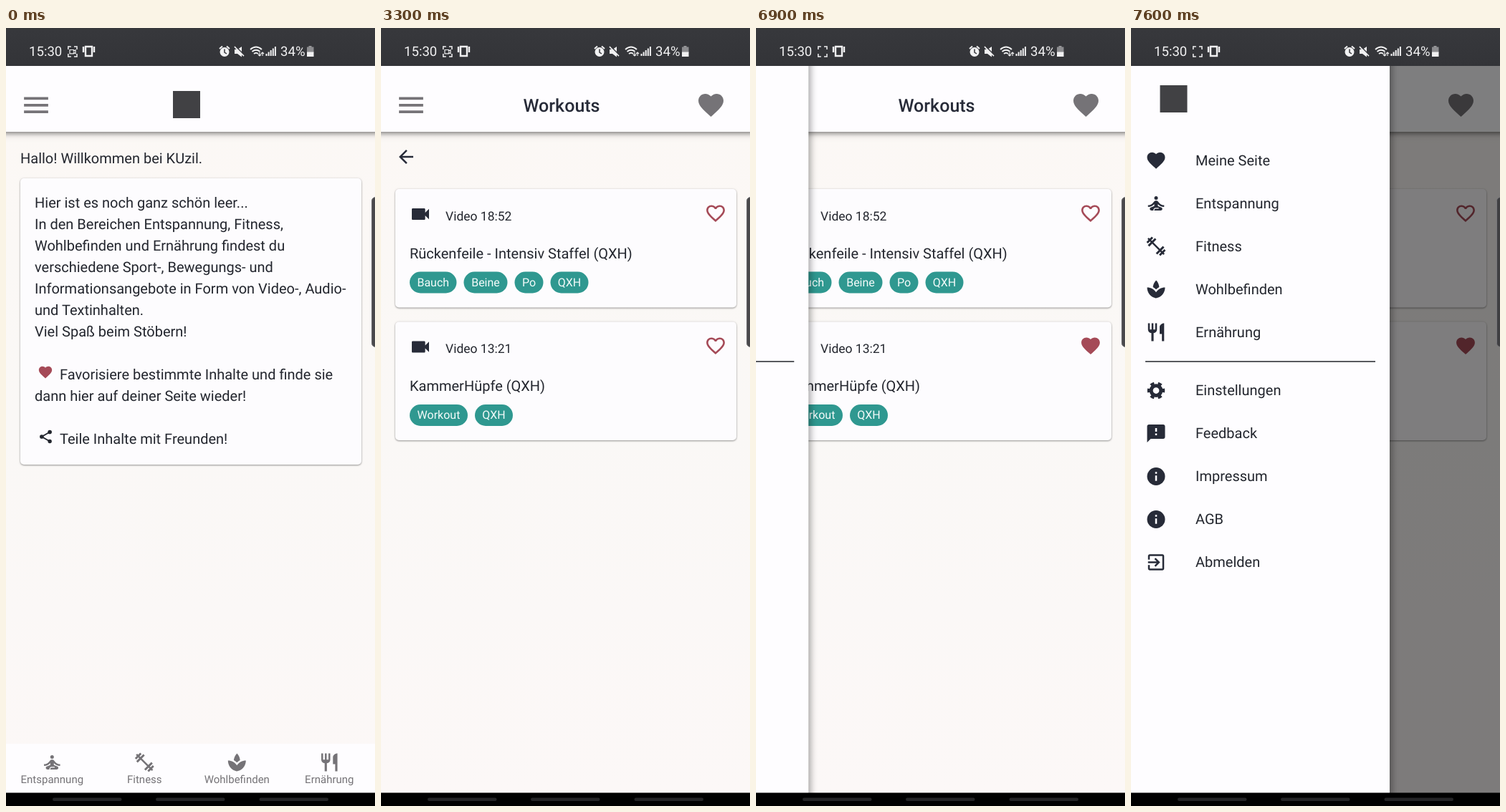
An HTML page for the animation above (8000 ms loop, 515 by 1087 pixels).

```html
<!DOCTYPE html>
<html lang="de">
<head>
<meta charset="utf-8">
<title>App-Rundgang</title>
<style>
  html, body { margin: 0; width: 100%; height: 100%; overflow: hidden; background: #000; }
  svg { display: block; width: 515px; height: 1087px; font-family: Roboto, sans-serif; }
  text { text-rendering: geometricPrecision; white-space: pre; }
  .card { fill: #fdfcfe; filter: drop-shadow(0 1.5px 1px rgba(0,0,0,.36)) drop-shadow(0 0 1.5px rgba(0,0,0,.1)); }
  .toolbar { fill: #fefdff; filter: drop-shadow(0 2px 3px rgba(0,0,0,.42)) drop-shadow(0 3px 5px rgba(0,0,0,.14)); }
  .panel { fill: #fefdff; filter: drop-shadow(3px 0 5px rgba(0,0,0,.35)); }
</style>
</head>
<body>
<svg id="stage" viewBox="0 0 515 1087"></svg>
<script>
const INK = '#23262e', DARK = '#272b38', GREY = '#757377', RED = '#a54a57', TEAL = '#2f9890', LOGO = '#414144';
const LOOP = 8000, STEP = 100;

// Icons on a 24 unit grid
const HEART = '<path d="M12 21.35l-1.45-1.32C5.4 15.36 2 12.28 2 8.5 2 5.42 4.42 3 7.5 3c1.74 0 3.41.81 4.5 2.09C13.09 3.81 14.76 3 16.5 3 19.58 3 22 5.42 22 8.5c0 3.78-3.4 6.86-8.55 11.54z"/>';
const icons = {
  heart: HEART,
  heartLine: '<path d="M16.5 3c-1.74 0-3.41.81-4.5 2.09C10.91 3.81 9.24 3 7.5 3 4.42 3 2 5.42 2 8.5c0 3.78 3.4 6.86 8.55 11.54L12 21.35l1.45-1.32C18.6 15.36 22 12.28 22 8.5 22 5.42 19.58 3 16.5 3zm-4.4 15.55l-.1.1-.1-.1C7.14 14.24 4 11.39 4 8.5 4 6.5 5.5 5 7.5 5c1.54 0 3.04.99 3.57 2.36h1.87C13.46 5.99 14.96 5 16.5 5c2 0 3.5 1.5 3.5 3.5 0 2.89-3.14 5.74-7.9 10.05z"/>',
  share: '<path d="M18 5L6 12l12 7" fill="none" stroke="currentColor" stroke-width="2"/><circle cx="18" cy="5" r="3"/><circle cx="6" cy="12" r="3"/><circle cx="18" cy="19" r="2.9"/>',
  menu: '<path d="M3 18h18v-2H3zm0-5h18v-2H3zm0-7v2h18V6z"/>',
  back: '<path d="M20 11H7.83l5.59-5.59L12 4l-8 8 8 8 1.41-1.41L7.83 13H20z"/>',
  infoLine: '<circle cx="12" cy="12" r="9" fill="none" stroke="currentColor" stroke-width="2"/><path d="M11 7h2v2h-2zm0 4h2v6h-2z"/>',
  info: '<circle cx="12" cy="12" r="10"/><path d="M11 7h2v2h-2zm0 4h2v6h-2z" fill="#fefdff"/>',
  video: '<path d="M17 10.5V7c0-.55-.45-1-1-1H4c-.55 0-1 .45-1 1v10c0 .55.45 1 1 1h12c.55 0 1-.45 1-1v-3.5l4 4v-11z"/>',
  cutlery: '<path d="M11 9H9V2H7v7H5V2H3v7c0 2.12 1.66 3.84 3.75 3.97V22h2.5v-9.03C11.34 12.84 13 11.12 13 9V2h-2zm5-3v8h2.5v8H21V2c-2.76 0-5 2.24-5 4z"/>',
  leaf: '<path d="M15.49 9.63C15.31 6.84 14.18 4.12 12.06 2 9.92 4.14 8.74 6.86 8.51 9.63c1.28.68 2.46 1.56 3.49 2.63 1.03-1.06 2.21-1.94 3.49-2.63zM12 15.45C9.85 12.17 6.18 10 2 10c0 5.32 3.36 9.82 8.03 11.49.63.23 1.29.4 1.97.51.68-.12 1.33-.29 1.97-.51C18.64 19.82 22 15.32 22 10c-4.18 0-7.85 2.17-10 5.45z"/>',
  lotus: '<circle cx="12" cy="6" r="2"/><path d="M21 16v-2c-2.24 0-4.16-.96-5.6-2.68l-1.34-1.6C13.68 9.26 13.12 9 12.53 9h-1.05c-.6 0-1.15.26-1.53.72l-1.34 1.6C7.16 13.04 5.24 14 3 14v2c2.77 0 5.19-1.17 7-3.25V15l-3.88 1.55C5.45 16.82 5 17.48 5 18.21 5 19.2 5.8 20 6.79 20H9v-.5c0-1.38 1.12-2.5 2.5-2.5h3c.28 0 .5.22.5.5s-.22.5-.5.5h-3c-.83 0-1.5.67-1.5 1.5v.5h7.1c.85 0 1.65-.5 1.86-1.32.22-.86-.24-1.7-1.03-2.02L14 15v-2.25c1.81 2.08 4.23 3.25 7 3.25z"/>',
  dumbbell: '<g transform="translate(12 12) rotate(45)" fill="none" stroke="currentColor" stroke-width="2.3"><path d="M-12.6 0H12.6" stroke-width="2"/><path d="M-6.3-5.6V5.6M6.3-5.6V5.6M-9.9-4.2V4.2M9.9-4.2V4.2"/></g>',
  gear: '<g fill="none" stroke="currentColor"><circle cx="12" cy="12" r="5.5" stroke-width="4"/><circle cx="12" cy="12" r="8.3" stroke-width="3" pathLength="12" stroke-dasharray="1 1" stroke-dashoffset=".5"/></g>',
  feedback: '<path d="M20 2H4c-1.1 0-2 .9-2 2v18l4-4h14c1.1 0 2-.9 2-2V4c0-1.1-.9-2-2-2zm-7 12h-2v-2h2zm0-4h-2V6h2z"/>',
  exit: '<path d="M10.09 15.59L11.5 17l5-5-5-5-1.41 1.41L12.67 11H3v2h9.67zM19 3H5c-1.11 0-2 .9-2 2v4h2V5h14v14H5v-4H3v4c0 1.1.89 2 2 2h14c1.1 0 2-.9 2-2V5c0-1.1-.9-2-2-2z"/>'
};

const icon = (name, cx, cy, size, color, id = '') =>
  `<g ${id && `id="${id}"`} transform="translate(${cx - size / 2} ${cy - size / 2}) scale(${size / 24})" fill="${color}" color="${color}">${icons[name]}</g>`;
const text = (x, y, str, size = 20, fill = INK, extra = '') =>
  `<text x="${x}" y="${y}" font-size="${size}" fill="${fill}" ${extra}>${str}</text>`;
const rect = (x, y, w, h, fill, r = 0) =>
  `<rect x="${x}" y="${y}" width="${w}" height="${h}" rx="${r}" fill="${fill}"/>`;
const card = (y, h) => `<rect class="card" x="20" y="${y}" width="476" height="${h}" rx="5"/>`;
const centred = 'text-anchor="middle"';
const logo = (cx, cy) => rect(cx - 19, cy - 19, 38, 38, LOGO);
const title = str => text(252, 116.5, str, 25, DARK, centred + ' font-weight="500"') + icon('heart', 460.5, 107.7, 42, GREY);

function statusBar() {
  const w = '#f1f1f2', bg = '#35363a';
  const bars = [0, 1, 2, 3, 4].map(i => rect(362.5 + i * 3.1, 36 - i * 2.5, 2, 3 + i * 2.5, w)).join('');
  return rect(0, 0, 515, 53, 'url(#bar)') + text(32, 39.4, '15:30', 18.6, w) + text(383, 39.4, '34%', 18.6, w) +
    `<g fill="none" stroke="${w}" stroke-width="1.5">
      <path d="M86.8 30v-4h4M95 26h4v4M99 36v4h-4M90.800 40h-4v-4"/>
      <path d="M111 26h9v13h-9zM108 26v8M123 26v8" stroke-width="2.4"/>
      <path d="M341 30q8-7 16 0M343.500 33q5.500-4.500 11 0M346 36q3-2.500 6 0" stroke-width="1.900"/>
      <path d="M354 34v5m-2-2 2 2 2-2M358 39v-5m-2 2 2-2 2 2" stroke-width="1.100"/>
      <path d="M298 29l4-3.500M312 29l-4-3.500" stroke-width="2"/>
      <path d="M319 26l13 13" stroke-width="1.800"/>
    </g>
    <circle cx="305" cy="33.500" r="6.500" fill="${w}"/><path d="M305 29.500v4.500l3 2" fill="none" stroke="${bg}" stroke-width="1.500"/>
    <path d="M319 30v6h4l6 4.500V26l-6 4z" fill="${w}"/><path d="M320 25l13 13" stroke="${bg}" stroke-width="1.300"/>
    <path id="camera" d="M89 30.500h5.500v1.800l2.500-1.500v5l-2.500-1.500v1.500H89z" fill="none" stroke="${w}" stroke-width="1.200"/>` +
    bars + rect(422.5, 25, 4, 2, '#9a9a9c') + rect(420, 26.5, 9.5, 8, '#8c8c8f') + rect(420, 33.5, 9.5, 6.5, w);
}

function homePage() {
  const lines = ['Hier ist es noch ganz schön leer...', 'In den Bereichen Entspannung, Fitness,', 'Wohlbefinden und Ernährung findest du',
    'verschiedene Sport-, Bewegungs- und', 'Informationsangebote in Form von Video-, Audio-', 'und Textinhalten.', 'Viel Spaß beim Stöbern!'];
  return text(20, 189, 'Hallo! Willkommen bei KUzil.') + card(210, 400) +
    lines.map((s, i) => text(40, 251.3 + i * 30, s)).join('') +
    icon('heart', 55, 481, 22, RED) + text(75, 491.3, 'Favorisiere bestimmte Inhalte und finde sie') +
    text(40, 521.3, 'dann hier auf deiner Seite wieder!') +
    icon('share', 55.5, 571, 22.5, INK) + text(75, 581.3, 'Teile Inhalte mit Freunden!');
}

const fitnessPage = () => ['Alle Inhalte', 'Yoga', 'Workouts', 'Gesundheit', 'Aufwärmübungen'].map((s, i) => {
  const y = 155 + i * 62;
  return rect(40, y - .2, 436, 1.6, '#b25a68') + text(40, y + 38.2, s) + icon('infoLine', 444.7, y + 31.5, 23.5, GREY);
}).join('');

function videoCard(y, time, name, tags, heart) {
  let x = 40;
  const chips = tags.map(([label, w]) => {
    const chip = rect(x, y + 115.500, w, 30, TEAL, 15) + text(x + w / 2, y + 135.6, label, 16, '#f4fbfa', centred);
    x += w + 10;
    return chip;
  }).join('');
  return card(y, 165.5) + icon('video', 55, y + 35, 32, DARK) + text(90, y + 43.5, 'Video ' + time, 17.5) +
    text(40, y + 96.8, name) + chips + heart;
}

const workoutPage = () => icon('back', 35, 180, 30, DARK) +
  videoCard(225, '18:52', 'Rückenfeile - Intensiv Staffel (QXH)', [['Bauch', 65.5], ['Beine', 61], ['Po', 40], ['QXH', 53]],
    icon('heartLine', 467, 259, 31, RED)) +
  videoCard(410.5, '13:21', 'KammerHüpfe (QXH)', [['Workout', 81], ['QXH', 53]],
    '<circle id="ripple" cx="467" cy="444" r="18.5"/>' + icon('heartLine', 467, 444, 31, RED, 'unliked') + icon('heart', 467, 444, 31, RED, 'liked'));

const sections = [['lotus', 'Entspannung'], ['dumbbell', 'Fitness'], ['leaf', 'Wohlbefinden'], ['cutlery', 'Ernährung']];

const tabBar = () => rect(0, 1000, 515, 69, '#fefdff') + sections.map(([name, s], i) => {
  const x = 64.3 + i * 129;
  return icon(name, x, 1026, 30, GREY) + text(x, 1055, s, 15, GREY, centred);
}).join('');

function drawer() {
  const rows = [['heart', 'Meine Seite'], ...sections, ['gear', 'Einstellungen'], ['feedback', 'Feedback'],
    ['info', 'Impressum'], ['info', 'AGB'], ['exit', 'Abmelden']];
  return '<rect class="panel" x="-10" y="43" width="371" height="1036"/>' + logo(59.5, 99) + rect(20, 465.2, 321, 1.6, '#303338') +
    rows.map(([name, s], i) => {
      const y = 185 + i * 60 + (i > 4 ? 21.5 : 0);
      return icon(name, 35, y, 30, DARK) + text(90, y + 6.8, s);
    }).join('');
}

const group = (id, body) => `<g id="${id}">${body}</g>`;
document.getElementById('stage').innerHTML =
  `<defs>
    <linearGradient id="paper" x2="0" y2="1"><stop stop-color="#fcf8f5"/><stop offset=".5" stop-color="#faf8f6"/><stop offset="1" stop-color="#fcf8f7"/></linearGradient>
    <linearGradient id="bar" x2="0" y2="1"><stop stop-color="#37383c"/><stop offset="1" stop-color="#333438"/></linearGradient>
  </defs>` +
  rect(0, 53, 515, 1016, 'url(#paper)') +
  group('home', homePage()) + group('fitness', fitnessPage()) + group('workouts', workoutPage()) + group('tabs', tabBar()) +
  '<rect class="toolbar" x="-12" y="40" width="539" height="105"/>' + icon('menu', 42, 107.8, 45, GREY) +
  group('homeHead', logo(252, 107)) + group('fitnessHead', title('Fitness')) + group('workoutsHead', title('Workouts')) +
  '<rect id="shade" y="53" width="515" height="1016"/>' + group('drawer', drawer()) + statusBar() +
  '<rect x="510.5" y="236.500" width="12" height="209" rx="5" fill="#3a3a3d" fill-opacity=".92" stroke="#77777a" stroke-width="1"/>' +
  rect(0, 1068.5, 515, 19, '#000') + [65, 209, 353.5].map(x => rect(x, 1075.5, 96.5, 4.5, '#242426', 2.2)).join('');

const el = {};
document.querySelectorAll('#stage g[id], #camera, #ripple, #shade').forEach(n => el[n.id] = n);
const show = (id, on) => el[id].style.display = on ? '' : 'none';
const clamp = v => Math.max(0, Math.min(1, v));

// cubic-bezier(.25, .8, .25, 1)
function ease(x) {
  if (x <= 0 || x >= 1) return clamp(x);
  const curve = (s, a, b) => 3 * (1 - s) * (1 - s) * s * a + 3 * (1 - s) * s * s * b + s * s * s;
  let lo = 0, hi = 1;
  for (let i = 0; i < 20; i++) {
    const mid = (lo + hi) / 2;
    if (curve(mid, .25, .25) < x) lo = mid; else hi = mid;
  }
  return curve(lo, .8, 1);
}

function render(now) {
  const t = Math.floor((now % LOOP) / STEP) * STEP;
  const page = t < 1600 ? 'home' : t < 3100 ? 'fitness' : 'workouts';
  for (const p of ['home', 'fitness', 'workouts']) {
    show(p, p === page);
    show(p + 'Head', p === page);
  }
  show('tabs', page !== 'workouts');
  show('camera', Math.floor(t / 500) % 2 === 0);

  const liked = t >= 5100;
  show('liked', liked);
  show('unliked', !liked);
  show('ripple', t >= 5000 && t < 6800);
  el.ripple.setAttribute('r', 18.5 * clamp((t - 4900) / 400));
  el.ripple.setAttribute('fill-opacity', .045 + .06 * clamp((5700 - t) / 400));

  const open = ease((t - 6875) / 400);
  show('drawer', open > 0);
  el.drawer.setAttribute('transform', `translate(${361 * (open - 1)} 0)`);
  el.shade.setAttribute('fill-opacity', .5 * ease((t - 6900) / 400));
}

function tick() {
  render(performance.now());
  requestAnimationFrame(tick);
}
tick();
</script>
</body>
</html>
```
